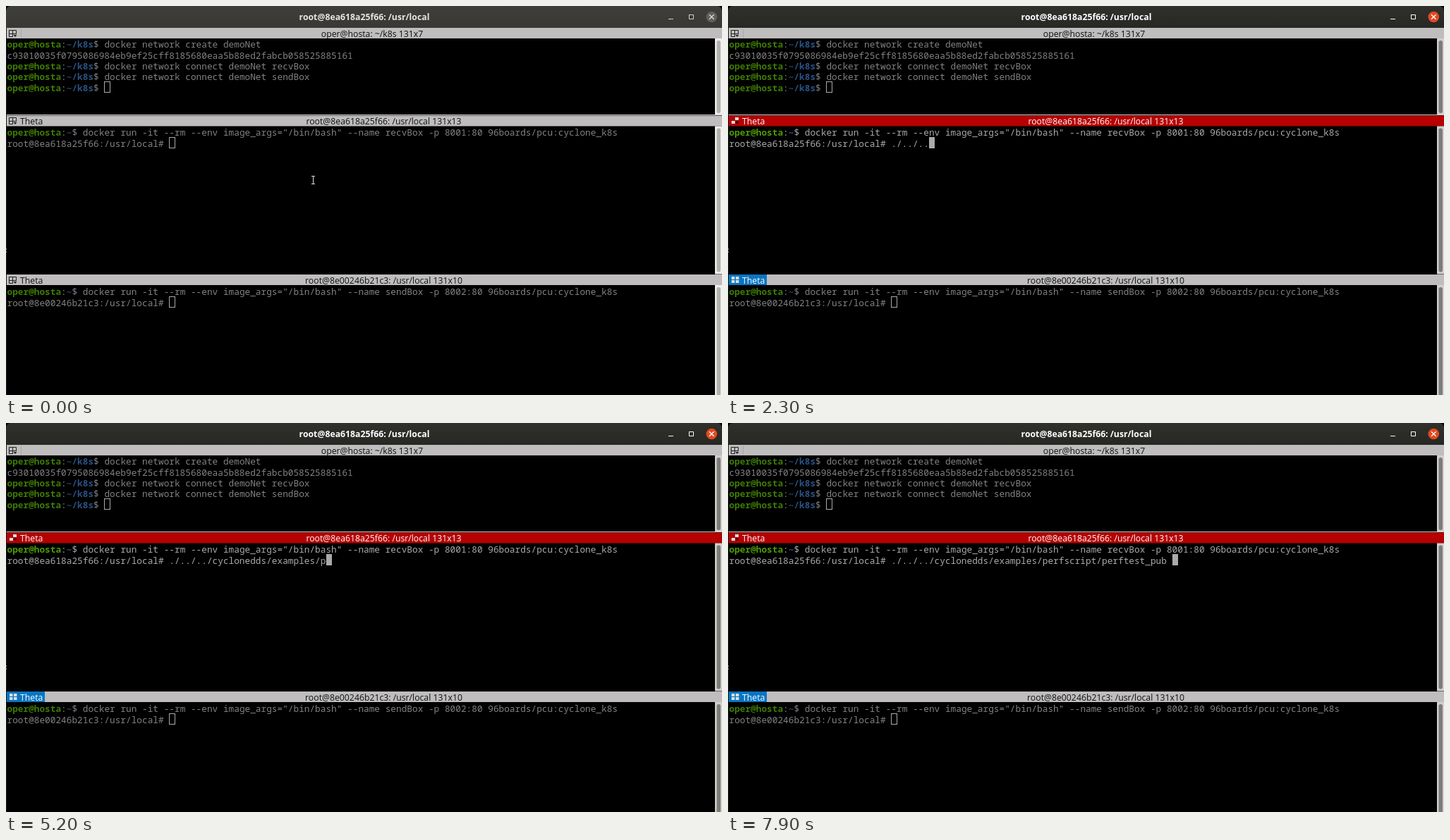
Animation, 1015 px wide and 552 px high, one loop 8000 ms. Source, as an HTML page with a canvas:

```html
<!DOCTYPE html>
<html lang="en">
<head>
<meta charset="utf-8">
<title>Split terminal</title>
<style>
html, body { margin: 0; width: 100%; height: 100%; overflow: hidden; background: #000; }
canvas { display: block; }
</style>
</head>
<body>
<canvas id="stage" width="1015" height="552"></canvas>
<script>
const ctx = document.getElementById('stage').getContext('2d');
const LOOP = 8000, CHAR = 7.662, LINE = 15.33, LEFT = 1.5;
const MONO = '12.77px "Noto Sans Mono", "DejaVu Sans Mono", monospace';
const UI = '12.25px "Open Sans", "Noto Sans", sans-serif';

const COMMAND = './../../cyclonedds/examples/perfscript/perftest_pub ';
// [time, characters typed]; jumps are tab completions
const TYPING = [
  [0, 0], [1100, 1], [1300, 2], [1600, 3], [1700, 4], [1800, 5], [2000, 6],
  [2300, 7], [2400, 8], [2700, 9], [2900, 10], [3100, 18], [4100, 20],
  [4400, 21], [4600, 22], [4700, 28], [5200, 29], [5300, 39], [5700, 40],
  [6000, 47], [7100, 48], [7700, 49], [7900, 52]
];
const CURSOR_OFF = [[900, 1100], [3600, 4100], [6500, 6700]];
const BELL = [[2900, 3900], [6000, 7000]];
const within = (t, spans) => spans.some(([from, to]) => t >= from && t < to);

const BRIGHT = { text: '#aaaaaa', login: '#4e9a06', path: '#3465a4' };
const DIM = { text: '#828282', login: '#3e7b05', path: '#2a5183' };

function rect(x, y, w, h, color) {
  ctx.fillStyle = color;
  ctx.fillRect(x, y, w, h);
}

function rounded(x, y, w, h, r, color) {
  ctx.fillStyle = color;
  ctx.beginPath();
  ctx.roundRect(x, y, w, h, r);
  ctx.fill();
}

function lines(color, width, ...paths) {
  ctx.strokeStyle = color;
  ctx.lineWidth = width;
  ctx.beginPath();
  for (const [start, ...rest] of paths) {
    ctx.moveTo(...start);
    rest.forEach(p => ctx.lineTo(...p));
  }
  ctx.stroke();
}

function disc(x, y, r, color) {
  ctx.fillStyle = color;
  ctx.beginPath();
  ctx.arc(x, y, r, 0, 7);
  ctx.fill();
}

function label(str, x, y, color, font = UI, align = 'left') {
  ctx.font = font;
  ctx.textAlign = align;
  ctx.fillStyle = color;
  ctx.fillText(str, x, y);
}

function mono(str, col, y, color, bold) {
  label(str, LEFT + col * CHAR, y, color, (bold ? 'bold ' : '') + MONO);
}

function prompt(top, row, path, command, ink) {
  const y = top + row * LINE + 12.2;
  mono('oper@hosta', 0, y, ink.login, true);
  mono(':', 10, y, ink.text);
  mono(path, 11, y, ink.path, true);
  mono('$ ' + command, 11 + path.length, y, ink.text);
}

function cursor(top, row, col, solid) {
  const x = Math.round(LEFT + col * CHAR), y = Math.round(top + row * LINE);
  if (solid) return rect(x, y - 1, 8, 16, BRIGHT.text);
  ctx.strokeStyle = '#aaaaaa';
  ctx.lineWidth = 1;
  ctx.strokeRect(x + 0.5, y - 0.5, 8, 15);
}

function gridIcon(y) {
  lines('#222', 1,
    [[14.5, y + 6], [14.5, y + 0.5], [4.5, y + 0.5], [4.5, y + 9.5], [10, y + 9.5]],
    [[9.5, y], [9.5, y + 10]], [[4, y + 5.5], [15, y + 5.5]]);
  ctx.fillStyle = '#222';
  ctx.beginPath();
  ctx.moveTo(10.5, y + 7);
  ctx.lineTo(15.5, y + 7);
  ctx.lineTo(13, y + 10);
  ctx.fill();
}

function bar(y, title, bg, color, shift = 0) {
  rect(1, y, 1014, 15, bg);
  label(title, 535.5 - shift, y + 12.5, color, UI, 'center');
}

function scrollbar(y, h, active) {
  rect(1005, y, 10, h, active ? '#d0cfcd' : '#efeeec');
  rounded(1007.5, y + 3, 5.5, h - 6, 2.7, active ? '#7d7c79' : '#b3b1ae');
}

function bell() {
  disc(1007.5, 161.5, 4.6, '#d8d6d6');
  disc(1008, 162, 2.6, '#8f7474');
  disc(1006.5, 160.5, 1.5, '#fff');
  rect(1006, 166, 3, 3, '#c9c5c5');
}

function windowBar(active) {
  const shade = ctx.createLinearGradient(0, 0, 0, 31);
  shade.addColorStop(0, active ? '#30302d' : '#3f3e3b');
  shade.addColorStop(1, active ? '#272724' : '#393835');
  rounded(0, 0, 1015, 31, [7, 7, 0, 0], shade);
  const ink = active ? '#fff' : '#d0cfcc';
  label('root@8ea618a25f66: /usr/local', 508, 20, active ? '#fff' : '#e6e5e2', 'bold ' + UI, 'center');
  lines(ink, 1, [[939, 18.5], [946, 18.5]],
    [[968.5, 12.5], [974.5, 12.5], [974.5, 18.5], [968.5, 18.5], [968.5, 12]]);
  disc(1000.3, 15.5, 7.8, active ? '#e2491f' : '#605f5b');
  lines(active ? '#fff' : '#dddcd9', 1.3, [[997, 12.2], [1003.6, 18.8]], [[1003.6, 12.2], [997, 18.8]]);
}

function draw(t) {
  const active = t >= 300;
  const grey = '#bfbdbd';
  const run = (name, port) => 'docker run -it --rm --env image_args="/bin/bash" --name ' +
    name + ' -p ' + port + ':80 96boards/pcu:cyclone_k8s';

  rect(0, 0, 1015, 552, '#000');
  windowBar(active);

  // Top pane
  bar(31, '', grey, '#111');
  label('oper@hosta: ~/k8s 131x7', 519, 43.5, '#111', UI, 'center');
  gridIcon(34);
  rect(21, 33, 1, 12, '#a9a7a7');
  const home = '~/k8s';
  prompt(47, 0, home, 'docker network create demoNet', DIM);
  mono('c93010035f0795086984eb9ef25cff8185680eaa5b88ed2fabcb058525885161', 0, 47 + LINE + 12.2, DIM.text);
  prompt(47, 2, home, 'docker network connect demoNet recvBox', DIM);
  prompt(47, 3, home, 'docker network connect demoNet sendBox', DIM);
  prompt(47, 4, home, '', DIM);
  cursor(47, 4, 18);
  scrollbar(46, 109, active);

  // Middle pane
  const ringing = within(t, BELL);
  const ink = active ? BRIGHT : DIM;
  const typed = TYPING.findLast(([time]) => t >= time)[1];
  rect(1, 154, 1014, 1, '#d5d3d3');
  bar(155.5, 'root@8ea618a25f66: /usr/local 131x13', active ? '#b60002' : grey, active ? '#fff' : '#111', ringing ? 8.5 : 0);
  if (active) {
    rect(10, 158, 5, 4, '#ddd');
    rect(5, 163, 5, 4, '#ddd');
    rect(11, 163, 4, 4, '#650000');
  } else gridIcon(158);
  label('Theta', 20, 168, active ? '#fff' : '#111');
  if (ringing) bell();
  prompt(172, 0, '~', run('recvBox', 8001), ink);
  mono('root@8ea618a25f66:/usr/local# ' + COMMAND.slice(0, typed), 0, 172 + LINE + 12.2, ink.text);
  if (!within(t, CURSOR_OFF)) cursor(172, 1, 30 + typed, active);
  scrollbar(170.5, 210, active);

  // Bottom pane
  bar(381, 'root@8e00246b21c3: /usr/local 131x10', grey, '#111');
  if (active) {
    rect(1, 381, 54, 15, '#0775c3');
    for (const [x, y] of [[5, 384], [11, 384], [5, 389], [11, 389]]) rect(x, y, 4.5, 4, '#ddd');
  } else gridIcon(384);
  label('Theta', 20, 393.5, active ? '#fff' : '#111');
  prompt(398, 0, '~', run('sendBox', 8002), DIM);
  mono('root@8e00246b21c3:/usr/local# ', 0, 398 + LINE + 12.2, DIM.text);
  cursor(398, 1, 30);
  scrollbar(396, 170, active);

  rect(0, 31, 1, 521, '#1c1c1b');
  rect(0, 344, 1, 2, '#888');
  rect(0, 348, 1, 2, '#888');

  // Mouse pointer
  if (t < 1100) lines('#ddd', 1, [[433, 241.5], [438, 241.5]], [[435.5, 241], [435.5, 253]], [[433, 252.5], [438, 252.5]]);
}

function tick(now) {
  draw(now % LOOP);
  requestAnimationFrame(tick);
}
draw(0);
requestAnimationFrame(tick);
</script>
</body>
</html>
```
